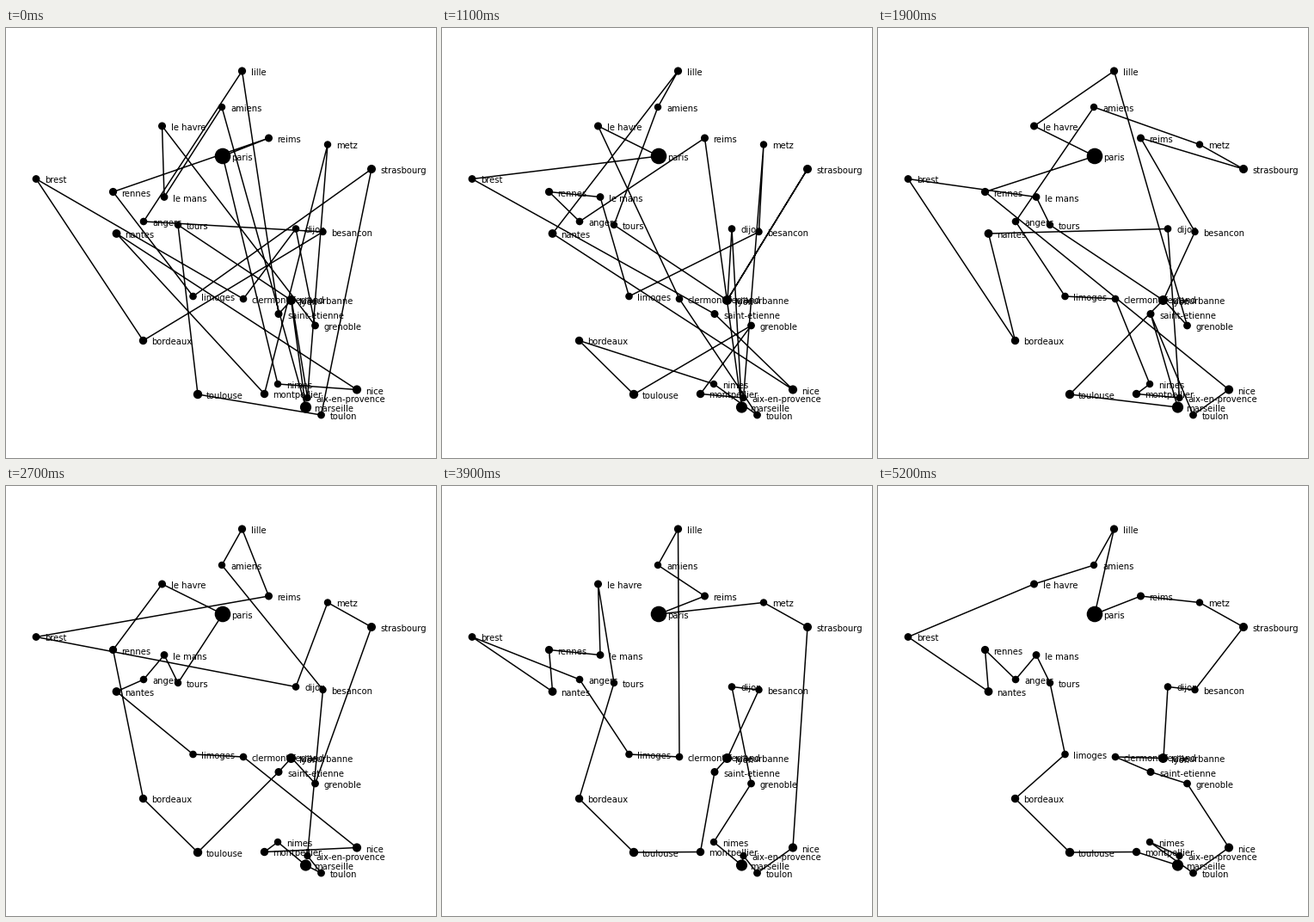
Recreate the animation shown at these times as a matplotlib script. Size 500 by 500 pixels, loop 7100 ms.

```python
import matplotlib.pyplot as plt
from matplotlib.animation import FuncAnimation
from matplotlib.patches import Circle

SIZE, DPI, STEP_MS, FRAMES = 500, 100, 100, 71
PX = 72 / DPI

# name: x, y, dot radius
CITIES = {
    "lille": (274.5, 50, 4.6), "amiens": (251, 92, 4.2),
    "le-havre": (181.5, 114, 4.5), "reims": (305.5, 128, 4.5),
    "paris": (252, 149, 9.3), "metz": (374, 135.5, 4.2),
    "strasbourg": (425, 164, 5), "brest": (35, 175.5, 4.4),
    "rennes": (124.5, 190.5, 4.6), "le-mans": (184, 196.5, 4.4),
    "angers": (160, 225, 4.3), "tours": (200, 229, 4.2),
    "nantes": (128.5, 239, 4.9), "dijon": (337, 233.5, 4.3),
    "besancon": (368.5, 237, 4.2), "limoges": (217.5, 312, 4.3),
    "clermont-ferrand": (276, 315, 4.3), "lyon": (331.5, 316.5, 5.5),
    "villeurbanne": (332, 316, 4.2), "saint-etienne": (317, 332.5, 4.5),
    "grenoble": (359.5, 346, 4.4), "bordeaux": (159.5, 363.5, 4.7),
    "nimes": (316, 414, 4.2), "montpellier": (300.5, 425.5, 4.7),
    "toulouse": (223, 426, 5.2), "nice": (408, 420.5, 5.1),
    "aix-en-provence": (350.5, 430, 4.2), "marseille": (348.5, 441, 6.6),
    "toulon": (366.5, 450, 4.4),
}

# Tours reached at given steps of the search
TOURS = {
    0: """saint-etienne villeurbanne aix-en-provence metz montpellier nantes
        nice nimes paris reims rennes limoges strasbourg toulon toulouse tours
        lyon marseille amiens le-mans le-havre grenoble dijon clermont-ferrand
        brest bordeaux besancon angers lille""",
    6: """lille strasbourg paris brest dijon saint-etienne tours montpellier
        le-mans amiens le-havre rennes grenoble toulouse besancon
        aix-en-provence marseille reims nice metz limoges bordeaux nimes
        toulon clermont-ferrand angers villeurbanne lyon nantes""",
    14: """lille amiens tours lyon strasbourg villeurbanne dijon marseille
        reims angers rennes le-mans limoges besancon metz aix-en-provence
        montpellier nice toulon nimes clermont-ferrand nantes bordeaux paris
        grenoble toulouse saint-etienne brest le-havre""",
    19: """lille le-havre paris rennes nice toulon saint-etienne marseille
        toulouse lyon tours le-mans brest bordeaux nantes dijon
        aix-en-provence montpellier nimes clermont-ferrand limoges angers
        amiens metz strasbourg reims besancon villeurbanne grenoble""",
    27: """lille amiens besancon aix-en-provence toulon marseille nimes
        montpellier nice clermont-ferrand limoges nantes angers le-mans tours
        paris le-havre rennes bordeaux toulouse saint-etienne lyon
        villeurbanne grenoble strasbourg metz dijon brest reims""",
    39: """lille amiens reims paris metz strasbourg nice toulon
        aix-en-provence marseille nimes grenoble dijon besancon villeurbanne
        lyon saint-etienne montpellier toulouse bordeaux tours le-havre
        le-mans rennes nantes brest angers limoges clermont-ferrand""",
    52: """paris reims metz strasbourg besancon dijon villeurbanne lyon
        clermont-ferrand saint-etienne grenoble nice toulon nimes
        aix-en-provence marseille montpellier toulouse bordeaux limoges tours
        le-mans angers rennes nantes brest le-havre amiens lille""",
}


def reversals(start, goal):
    """Tours from start to goal, one segment reversal apart."""
    first = start.index(goal[0])
    tour = start[first:] + start[:first]
    states = [tour]
    for i, city in enumerate(goal):
        j = tour.index(city)
        if j != i:
            tour = tour[:i] + tour[i:j + 1][::-1] + tour[j + 1:]
            states.append(tour)
    return states


def build_history():
    stops = [(step, text.split()) for step, text in TOURS.items()]
    history = []
    for (t0, start), (t1, goal) in zip(stops, stops[1:]):
        states = reversals(start, goal)
        for k in range(t1 - t0):
            history.append(states[round(k / (t1 - t0) * (len(states) - 1))])
    return history + [stops[-1][1]]


HISTORY = build_history()

fig = plt.figure(figsize=(SIZE / DPI, SIZE / DPI), dpi=DPI, facecolor="white")
ax = fig.add_axes([0, 0, 1, 1])
ax.set_xlim(0, SIZE)
ax.set_ylim(SIZE, 0)
ax.axis("off")

route, = ax.plot([], [], color="black", lw=1.5 * PX, solid_joinstyle="round")
for name, (x, y, radius) in CITIES.items():
    ax.add_patch(Circle((x, y), radius, color="black", lw=0, zorder=3))
    label = name.replace("le-", "le ") if name.startswith("le-") else name
    ax.text(x + 10, y + 5, label, fontsize=10 * PX, family="DejaVu Sans",
            color="black", va="baseline", zorder=4)


def update(frame):
    tour = HISTORY[min(frame, len(HISTORY) - 1)]
    points = [CITIES[name][:2] for name in tour + tour[:1]]
    route.set_data(*zip(*points))
    return route,


anim = FuncAnimation(fig, update, frames=FRAMES, interval=STEP_MS,
                     repeat=True, repeat_delay=0)
plt.show()
```
